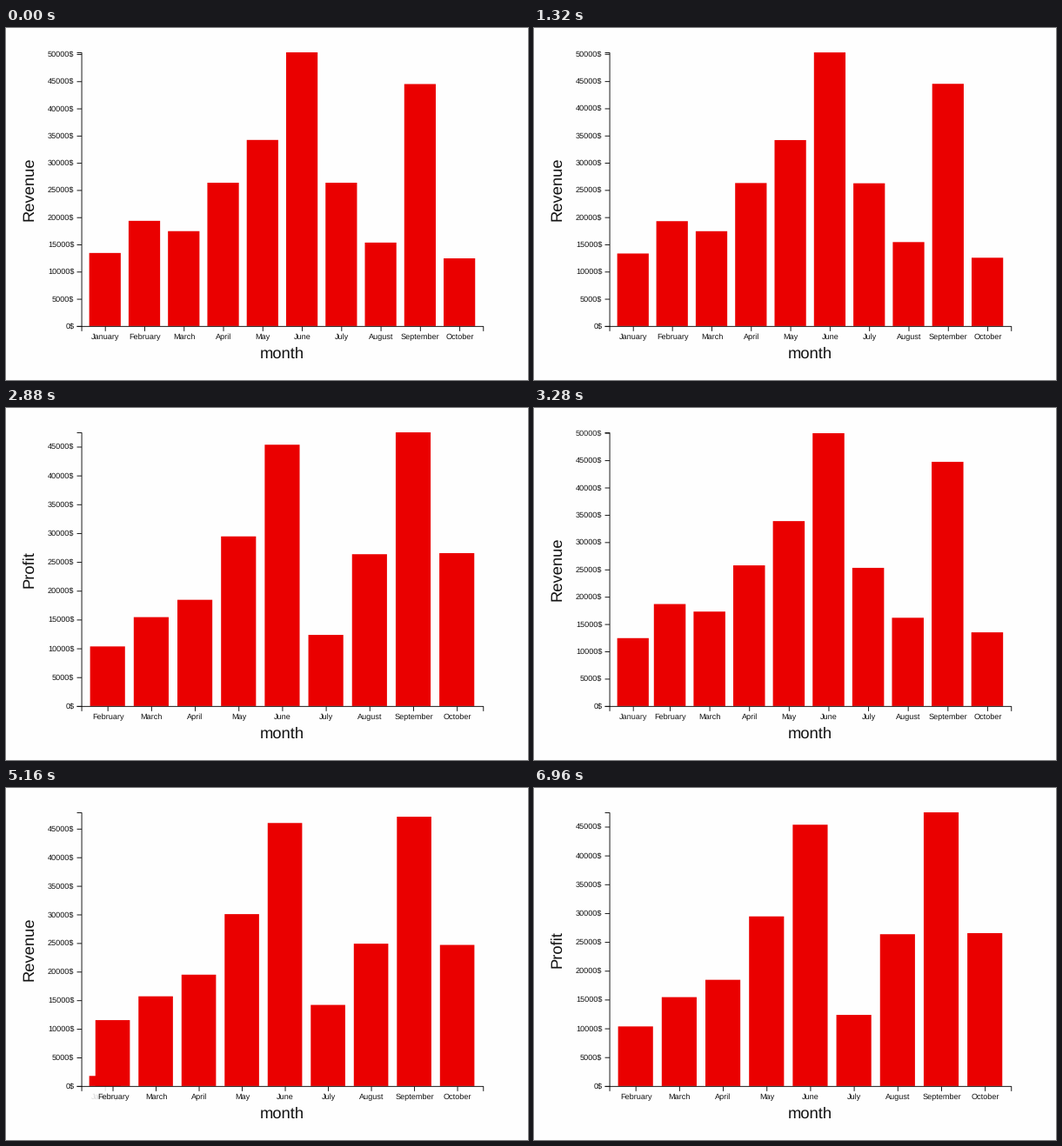
Recreate the animation shown at these times as a matplotlib script. Size 600 by 405 pixels, loop 7 s.

```python
import matplotlib.pyplot as plt
from matplotlib.animation import FuncAnimation
from matplotlib.patches import Rectangle

plt.rcParams["font.family"] = "Liberation Sans"
plt.rcParams["text.hinting"] = "none"

DPI = 100
PX = 72 / DPI                      # points per pixel
STEP, LOOP = 40, 7000              # ms
PERIOD, START, DURATION = 1000, 65.5, 290
X0, Y0, W, H = 86.6, 342.9, 461.7, 314.9
HALF = 0.46                        # axis offset
TICK = 5.5
BG, INK, RED, GREY = "#fefefe", "#111111", "#ea0000", "#808080"

MONTHS = ["January", "February", "March", "April", "May", "June",
          "July", "August", "September", "October"]
DATA = {
    "Revenue": [13432, 19342, 17443, 26342, 34213, 50321,
                26342, 15342, 44490, 12443],
    "Profit": [None, 10342, 15423, 18432, 29434, 45343,
               12342, 26342, 47490, 26532],
}
AMOUNTS = range(0, 50001, 5000)


def layout(name):
    """Band scale and linear scale for one series."""
    vals = DATA[name]
    top = max(v for v in vals if v is not None)
    step = W / (sum(v is not None for v in vals) + 0.2)
    boxes, x = [], X0 + 0.2 * step
    for v in vals:
        if v is None:
            boxes.append(None)
            continue
        boxes.append((x, 0.8 * step, v / top * H))
        x += step
    return boxes, H / top


LAYOUTS = {name: layout(name) for name in DATA}


def ease(u):
    return 4 * u ** 3 if u < 0.5 else 1 - 4 * (1 - u) ** 3


def mix(a, b, e):
    return a + (b - a) * e


fig = plt.figure(figsize=(600 / DPI, 405 / DPI), dpi=DPI, facecolor=BG)
ax = fig.add_axes([0, 0, 1, 1])
ax.set_xlim(0, 600)
ax.set_ylim(405, 0)
ax.axis("off")


def line(xs=(), ys=()):
    return ax.plot(xs, ys, color=INK, lw=0.95 * PX, zorder=3,
                   solid_capstyle="butt", solid_joinstyle="miter",
                   snap=False)[0]


def label(x, y, s, size, **kw):
    return ax.text(x, y, s, fontsize=size * PX, color=INK, zorder=4,
                   va="baseline", **kw)


bars = [ax.add_patch(Rectangle((0, 0), 0, 0, fc=RED, lw=0, snap=False,
                               zorder=2)) for _ in MONTHS]
x_ticks = [(line(), label(0, Y0 + 15.1, m, 9.2, ha="center")) for m in MONTHS]
y_ticks = [(line(), label(X0 - 8.2, 0, f"{a}$", 9.1, ha="right"))
           for a in AMOUNTS]

left, base = X0 + HALF, Y0 + HALF
right, top = left + W, base - H
line([left - TICK, left, left, left - TICK], [top, top, base, base])
line([left, left, right, right], [base + TICK, base, base, base + TICK])
label(X0 + W / 2, 380, "month", 18.4, ha="center")
title = label(31, Y0 - H / 2, "", 18.4, ha="right", rotation=90,
              rotation_mode="anchor")
title.set_ha("center")
# upper edge of the drawing area
ax.add_patch(Rectangle((0, 0), 600, 18, fc=BG, lw=0, zorder=5))


def fade(tick, alpha):
    for part in tick:
        part.set_alpha(alpha)


def draw(i):
    turn, phase = divmod(i * STEP - START, PERIOD)
    e = ease(min(1, phase / DURATION))
    new, old = ("Profit", "Revenue") if turn % 2 == 0 else ("Revenue", "Profit")
    (a, ka), (b, kb) = LAYOUTS[old], LAYOUTS[new]
    title.set_text(new)

    for bar, tick, p, q in zip(bars, x_ticks, a, b):
        if p and q:
            x, w, h = (mix(s, t, e) for s, t in zip(p, q))
            alpha = 1
        else:
            x, w, h = p or q
            alpha = e if q else 1 - e
            h *= alpha
        bar.set_bounds(x, Y0 - h, w, h)
        bar.set_facecolor(RED if q else GREY)
        mid = x + w / 2 + HALF
        tick[0].set_data([mid, mid], [base, base + TICK])
        tick[1].set_x(mid)
        fade(tick, alpha)

    for tick, amount in zip(y_ticks, AMOUNTS):
        y = base - amount * mix(ka, kb, e)
        tick[0].set_data([left - TICK, left], [y, y])
        tick[1].set_y(y + 2.9)
        fits = [amount * k <= H for k in (ka, kb)]
        fade(tick, mix(fits[0], fits[1], e))
    return []


anim = FuncAnimation(fig, draw, frames=LOOP // STEP, init_func=lambda: draw(0),
                     interval=STEP, repeat=True, repeat_delay=0, blit=False)
plt.show()
```
